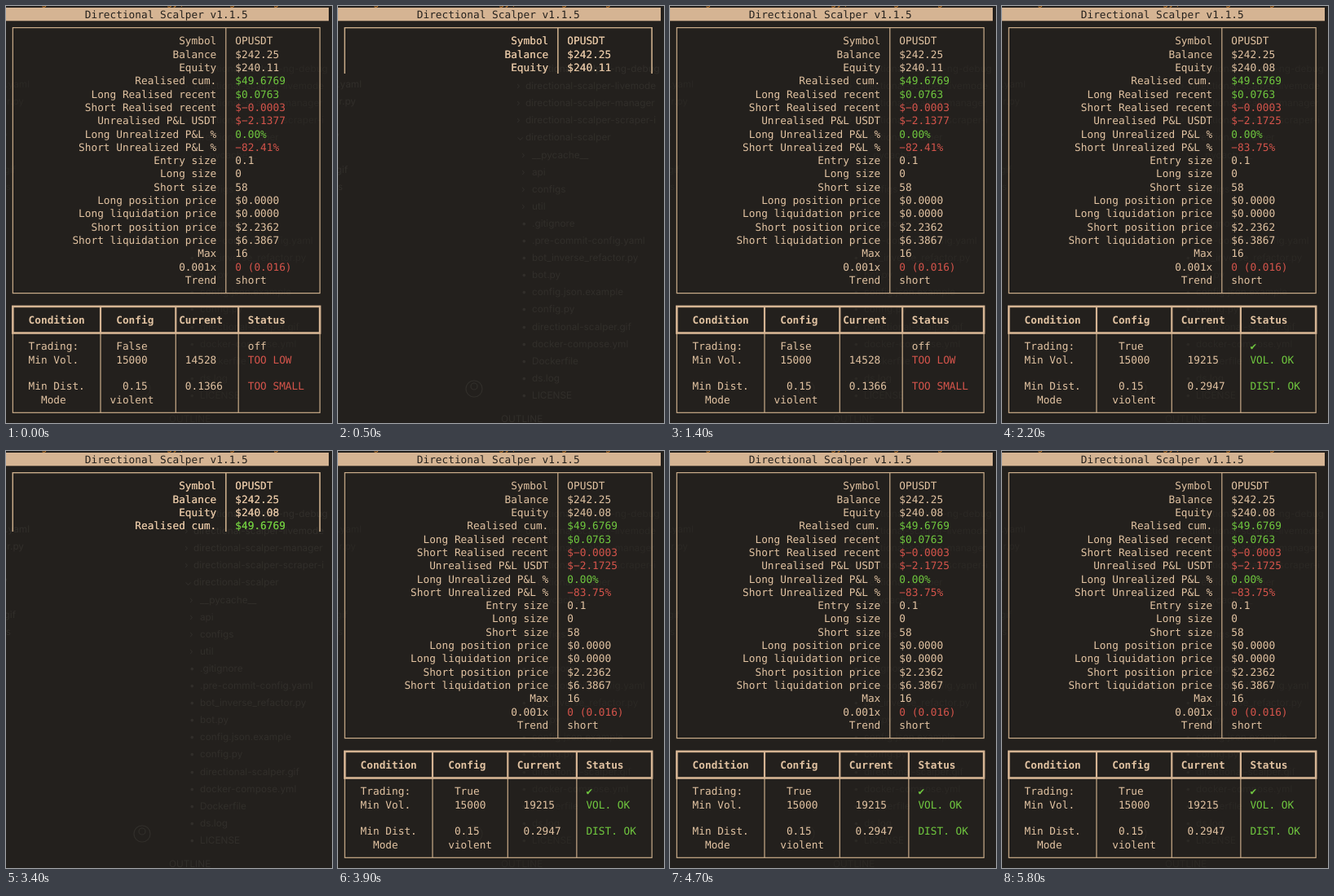
These frames come from a looping animation (400x512 px, 5900 ms). An HTML page with a canvas:

```html
<!DOCTYPE html>
<html lang="en">
<head>
<meta charset="utf-8">
<title>Directional Scalper</title>
<style>
html, body { margin: 0; width: 100%; height: 100%; overflow: hidden; background: #23201d; }
canvas { display: block; }
</style>
</head>
<body>
<canvas id="stage" width="400" height="512"></canvas>
<script>
const ctx = document.getElementById('stage').getContext('2d');
const LOOP = 5900, CELL = 7.69, ROW = 16.3;
const BG = '#23201d', SAND = '#e2c3a2', LINE = '#cbad8a', BAR = '#d5b493';
const GREEN = '#70c83f', RED = '#d5544b';
const MONO = '12.77px "DejaVu Sans Mono", "Liberation Mono", monospace';
const UPDATE = 2100;

// Moments when the screen is cleared and only the top rows are back.
const redraws = [{ at: 500, rows: 4 }, { at: 1100, rows: 4 }, { at: 3400, rows: 5 }, { at: 4400, rows: 4 }];

const colX = c => 4.5 + c * CELL;
const midX = c => colX(c + 0.5);
const rowY = r => 10.3 + r * ROW;

function put(text, col, row, color = SAND, bold = false) {
  ctx.font = (bold ? 'bold ' : '') + MONO;
  ctx.fillStyle = color;
  [...text].forEach((ch, i) => {
    if (ch !== ' ') ctx.fillText(ch, colX(col + i), rowY(row) + 4.5);
  });
}

function line(x1, y1, x2, y2, width = 1.2) {
  ctx.lineWidth = width;
  ctx.beginPath();
  ctx.moveTo(x1, y1);
  ctx.lineTo(x2, y2);
  ctx.stroke();
}

function frame(r1, r2, width) {
  ctx.lineWidth = width;
  ctx.strokeRect(midX(0), rowY(r1), midX(49) - midX(0), rowY(r2) - rowY(r1));
}

// Faint file tree behind the translucent terminal.
const tree = [
  'directional-scalper-ng-debug', 'directional-scalper-livemode', 'directional-scalper-manager',
  'directional-scalper-scraper-i', 'directional-scalper', '__pycache__', 'api', 'configs', 'util',
  '.gitignore', '.pre-commit-config.yaml', 'bot_inverse_refactor.py', 'bot.py', 'config.json.example',
  'config.py', 'directional-scalper.gif', 'docker-compose.yml', 'Dockerfile', 'ds.log', 'LICENSE'
];
const leftEnds = [['.yaml', 29, 96], ['r.py', 22, 117], ['y', 2, 159], ['.gif', 12, 201], ['s', 6, 222]];

function backdrop(alpha) {
  ctx.globalAlpha = alpha;
  ctx.fillStyle = ctx.strokeStyle = '#383430';
  ctx.font = '11.8px Inter, "Open Sans", sans-serif';
  tree.forEach((name, i) => {
    const y = 77 + i * 21.1;
    ctx.fillText(name, i < 5 ? 230 : 238, y + 4);
    ctx.fillText(i < 9 ? (i === 4 ? '⌄' : '›') : '•', i < 5 ? 219 : 225, y + 4);
  });
  ctx.fillText('OUTLINE', 200, 511);
  ctx.textAlign = 'right';
  leftEnds.forEach(([s, x, y]) => ctx.fillText(s, x, y + 4));
  ctx.textAlign = 'left';
  ctx.lineWidth = 1.2;
  ctx.beginPath();
  ctx.arc(167, 470, 10, 0, Math.PI * 2);
  ctx.moveTo(171, 467);
  ctx.arc(167, 467, 4, 0, Math.PI * 2);
  ctx.stroke();
  ctx.globalAlpha = 1;
}

function title() {
  put('Running directional strategy, loading config', -1, -1, '#d9862f');
  ctx.fillStyle = BAR;
  ctx.fillRect(0, 2, 396, 16.3);
  put('Directional Scalper v1.1.5', 12, 0, '#26221e');
}

function summary(live) {
  const rows = [
    ['Symbol', 'OPUSDT'],
    ['Balance', '$242.25'],
    ['Equity', live ? '$240.08' : '$240.11'],
    ['Realised cum.', '$49.6769', GREEN],
    ['Long Realised recent', '$0.0763', GREEN],
    ['Short Realised recent', '$−0.0003', RED],
    ['Unrealised P&L USDT', live ? '$−2.1725' : '$−2.1377', RED],
    ['Long Unrealized P&L %', '0.00%', GREEN],
    ['Short Unrealized P&L %', live ? '−83.75%' : '−82.41%', RED],
    ['Entry size', '0.1'],
    ['Long size', '0'],
    ['Short size', '58'],
    ['Long position price', '$0.0000'],
    ['Long liquidation price', '$0.0000'],
    ['Short position price', '$2.2362'],
    ['Short liquidation price', '$6.3867'],
    ['Max', '16'],
    ['0.001x', '0 (0.016)', RED],
    ['Trend', 'short']
  ];
  ctx.strokeStyle = LINE;
  frame(1, 21, 1.2);
  line(midX(34), rowY(1), midX(34), rowY(21));
  rows.forEach(([label, value, color], i) => {
    put(label, 33 - label.length, i + 2);
    put(value, 36, i + 2, color);
  });
}

function conditions(live) {
  const d = live ? 1 : 0, tone = live ? GREEN : RED;
  const rules = [14, 26, 36 + d];
  ctx.strokeStyle = LINE;
  frame(24, 30, 1.2);
  rules.forEach(c => line(midX(c), rowY(24), midX(c), rowY(30)));
  ctx.strokeStyle = BAR;
  frame(22, 24, 2.6);
  rules.forEach(c => line(midX(c), rowY(22), midX(c), rowY(24), 2.2));

  put('Condition', 3, 23, SAND, true);
  put('Config', 17, 23, SAND, true);
  put('Current', 27 + d, 23, SAND, true);
  put('Status', 38 + d, 23, SAND, true);

  put('Trading:', 3, 25);
  put(live ? 'True' : 'False', 17 + d, 25);
  put(live ? '✔' : 'off', 38 + d, 25, live ? GREEN : SAND);

  put('Min Vol.', 3, 26);
  put('15000', 17 + d, 26);
  put(live ? '19215' : '14528', 28 + d, 26);
  put(live ? 'VOL. OK' : 'TOO LOW', 38 + d, 26, tone);

  put('Min Dist.', 3, 28);
  put('0.15', 18, 28);
  put(live ? '0.2947' : '0.1366', 28 + d, 28);
  put(live ? 'DIST. OK' : 'TOO SMALL', 38 + d, 28, tone);

  put('Mode', 5, 29);
  put('violent', 16 + d, 29);
}

function draw(t) {
  const live = t >= UPDATE;
  const partial = redraws.find(r => t >= r.at && t < r.at + 100);
  ctx.textRendering = 'geometricPrecision';
  ctx.fillStyle = BG;
  ctx.fillRect(0, 0, 400, 512);
  backdrop(partial ? 0.7 : 0.4);
  title();
  ctx.save();
  if (partial) {
    ctx.beginPath();
    ctx.rect(0, 0, 400, Math.floor(rowY(partial.rows) + ROW / 2));
    ctx.clip();
    summary(live);
  }
  summary(live);
  conditions(live);
  ctx.restore();
}

function tick() {
  draw(performance.now() % LOOP);
  requestAnimationFrame(tick);
}
tick();
</script>
</body>
</html>
```
